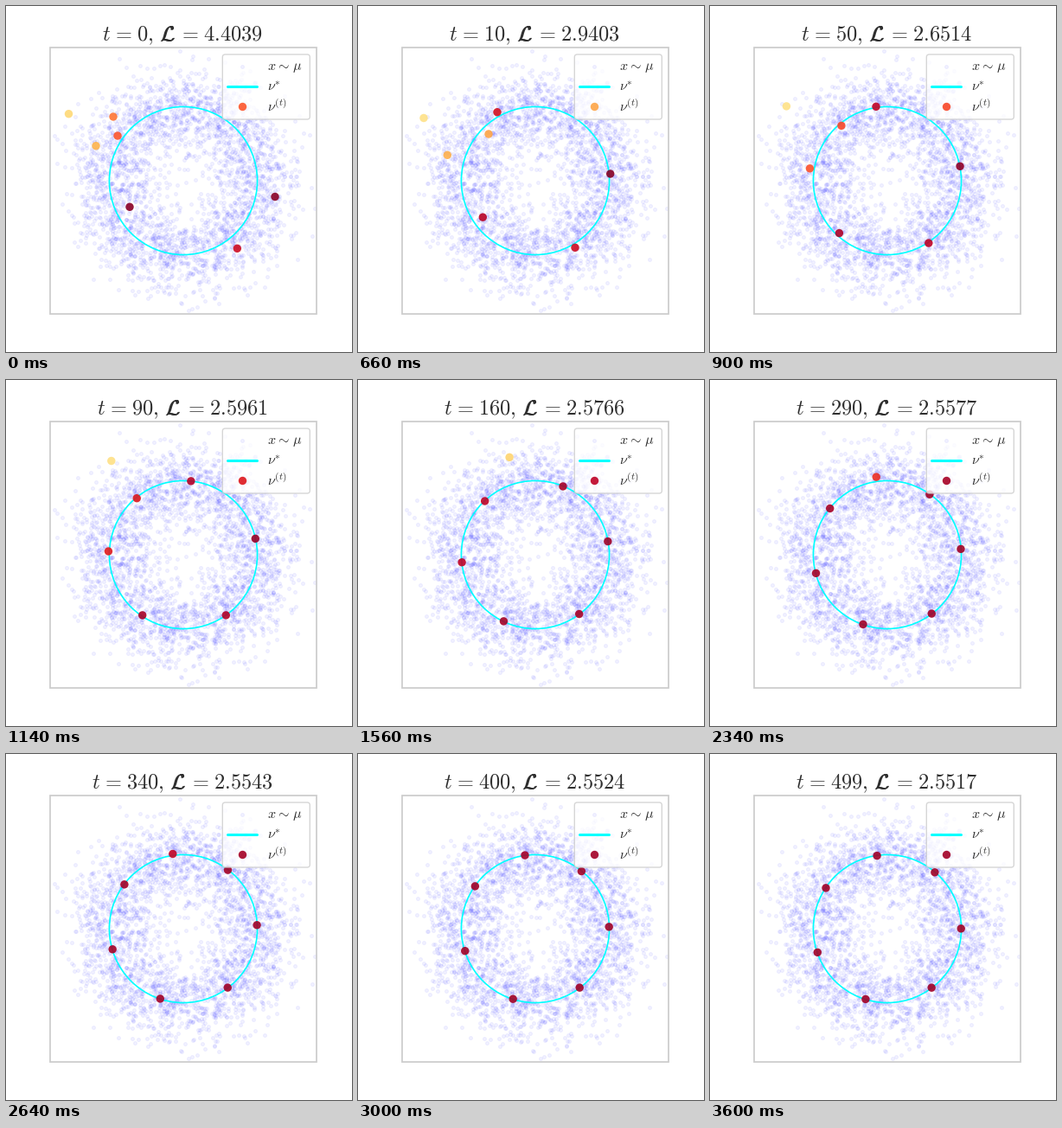
Write a matplotlib script that moves like this. It is 400 by 400 pixels and loops after 4.26 s.

```python
import numpy as np
import matplotlib.pyplot as plt
from matplotlib.animation import FuncAnimation
from matplotlib.patches import Circle, FancyBboxPatch, Rectangle

plt.rcParams["mathtext.fontset"] = "cm"

SIZE = 400
CX, CY, UNIT = 205, 202, 154 / 1.8
STEP_MS, HOLD, FRAMES = 60, 10, 71
FIRST, LAST = 10, 499
INK, GREY, CYAN = "0.18", "0.8", "#00ffff"

# Per particle: start, place after the first jump, weight at both, sideways push
PARTICLES = [
    ((129, 150), (151, 148), (.61, .42), .35),
    ((72.5, 124.7), (76, 129.5), (.25, .20), 0),
    ((124, 128), (161, 122.7), (.55, .80), -.10),
    ((311, 220.5), (291.7, 194), (.98, .99), -.30),
    ((267.3, 280.3), (251, 279.3), (.82, .82), -.03),
    ((143, 232.3), (144.3, 244.2), (.98, .89), 0),
    ((104, 161.7), (103.3, 172.3), (.37, .38), .17),
]
start, jump, weights, push = (np.array(column) for column in zip(*PARTICLES))
N = len(PARTICLES)
LATE = np.arange(N) == 1  # the lightest particle joins the ring last

# Resting places: almost evenly spaced on the circle
even = 1.3 + 360 / N * (np.arange(N) + 4)
REST_ANGLE = even + 2.5 + 2.8 * np.cos(np.radians(even - 190))
REST_RADIUS, REST_WEIGHT = 0.996 * UNIT, 0.93

dx, dy = (jump - (CX, CY)).T
ANGLE_GAP = (np.degrees(np.arctan2(dy, dx)) - REST_ANGLE + 180) % 360 - 180
RADIUS_GAP = np.hypot(dx, dy) - REST_RADIUS
WEIGHT_GAP = weights[:, 1] - REST_WEIGHT

LOSS_STEPS = [0, 10, 90, 160, 290, 400, 499]
LOSSES = np.array([4.4039, 2.9403, 2.5961, 2.5766, 2.5577, 2.5524, 2.5517])
LOSS_FLOOR = 2.55


def fade(s, tau, late_tau, late_power):
    """Exponential decay, with a slower onset for the late particle."""
    return np.where(LATE, np.exp(-(s / late_tau) ** late_power), np.exp(-s / tau))


def particle_state(t):
    if t < FIRST:
        return start, weights[:, 0]
    s = t - FIRST
    angle = np.radians(REST_ANGLE + (ANGLE_GAP + push * s) * fade(s, 100, 105, 2))
    radius = REST_RADIUS + RADIUS_GAP * fade(s, 30, 180, 2)
    weight = REST_WEIGHT + WEIGHT_GAP * fade(s, 70, 270, 4)
    xy = np.column_stack([CX + radius * np.cos(angle), CY + radius * np.sin(angle)])
    return xy, weight


def loss_at(t):
    log_gap = np.interp(np.log1p(t / 30), np.log1p(np.array(LOSS_STEPS) / 30),
                        np.log(LOSSES - LOSS_FLOOR))
    return LOSS_FLOOR + np.exp(log_gap)


fig = plt.figure(figsize=(4, 4), dpi=100, facecolor="white")
ax = fig.add_axes([0, 0, 1, 1])
ax.set(xlim=(0, SIZE), ylim=(SIZE, 0))
ax.axis("off")


def dots(xy, z):
    return ax.scatter(*np.transpose(xy), s=46, linewidths=0, zorder=z)


def faint_dots(xy, z):
    return ax.scatter(*np.transpose(xy), s=8, c="blue", alpha=0.05, linewidths=0.8, zorder=z)


def label(x, y, text, size, align="left"):
    return ax.text(x, y, text, size=size, color=INK, ha=align, va="baseline", zorder=7)


# Plot frame and noisy ring of samples
frame = Rectangle((51, 48), 308, 308, fill=False, ec=GREY, lw=1.25, zorder=4)
ax.add_patch(frame)
rng = np.random.default_rng(4)
theta = rng.uniform(0, 2 * np.pi, 3000)
ring = np.column_stack([np.cos(theta), np.sin(theta)])
samples = (CX, CY) + UNIT * (ring + rng.normal(0, 0.3, ring.shape))
faint_dots(samples, 1).set_clip_path(frame)
ax.add_patch(Circle((CX, CY), UNIT, fill=False, ec=CYAN, lw=1.2, zorder=2))
particles = dots(start, 3)

# Legend
ax.add_patch(FancyBboxPatch((250.3, 56), 101, 75, boxstyle="round,pad=0,rounding_size=3.2",
                            fc="white", ec=GREY, lw=1, alpha=0.8, zorder=5))
faint_dots([(272.5, 69.5)], 6)
ax.plot([256.3, 290], [92.6, 92.6], color=CYAN, lw=2.2, solid_capstyle="round", zorder=6)
key_dot = dots([(272.5, 116.4)], 6)
label(302.5, 74, r"$x\hspace{0.07}\sim\hspace{0.07}\mu$", 11.5)
label(302.5, 98.5, r"$\nu^{*}$", 11.5)
label(302.5, 122, r"$\nu^{(t)}$", 11.5)

# Title, with the script letter doubled to make it bold
TITLE_Y, TITLE_SIZE = 39.8, 17.5
step_text = label(0, TITLE_Y, "", TITLE_SIZE)
loss_text = label(0, TITLE_Y, "", TITLE_SIZE, "right")
script = [label(0, TITLE_Y, r"$\mathcal{L}$", TITLE_SIZE) for _ in range(2)]


def draw(i):
    t = min(max(i - HOLD, 0) * 10, LAST)

    xy, weight = particle_state(t)
    colors = plt.cm.YlOrRd(weight, alpha=0.9)
    particles.set_offsets(xy)
    particles.set_facecolor(colors)
    key_dot.set_facecolor(colors[:1])

    half = 93 + 6 * (len(str(t)) - 1)
    left, right = 204 - half, 204 + half
    step_text.set_text(rf"$t\hspace{{0.1}}=\hspace{{0.1}}{t},$")
    step_text.set_x(left)
    loss_text.set_text(rf"$=\hspace{{0.1}}{loss_at(t):.4f}$")
    loss_text.set_x(right + 0.5)
    for part, shift in zip(script, (-0.25, 0.25)):
        part.set_x(right - 119.5 + shift)
    return particles, key_dot, step_text, loss_text, *script


anim = FuncAnimation(fig, draw, frames=FRAMES, interval=STEP_MS, repeat=True, repeat_delay=0)
plt.show()
```
